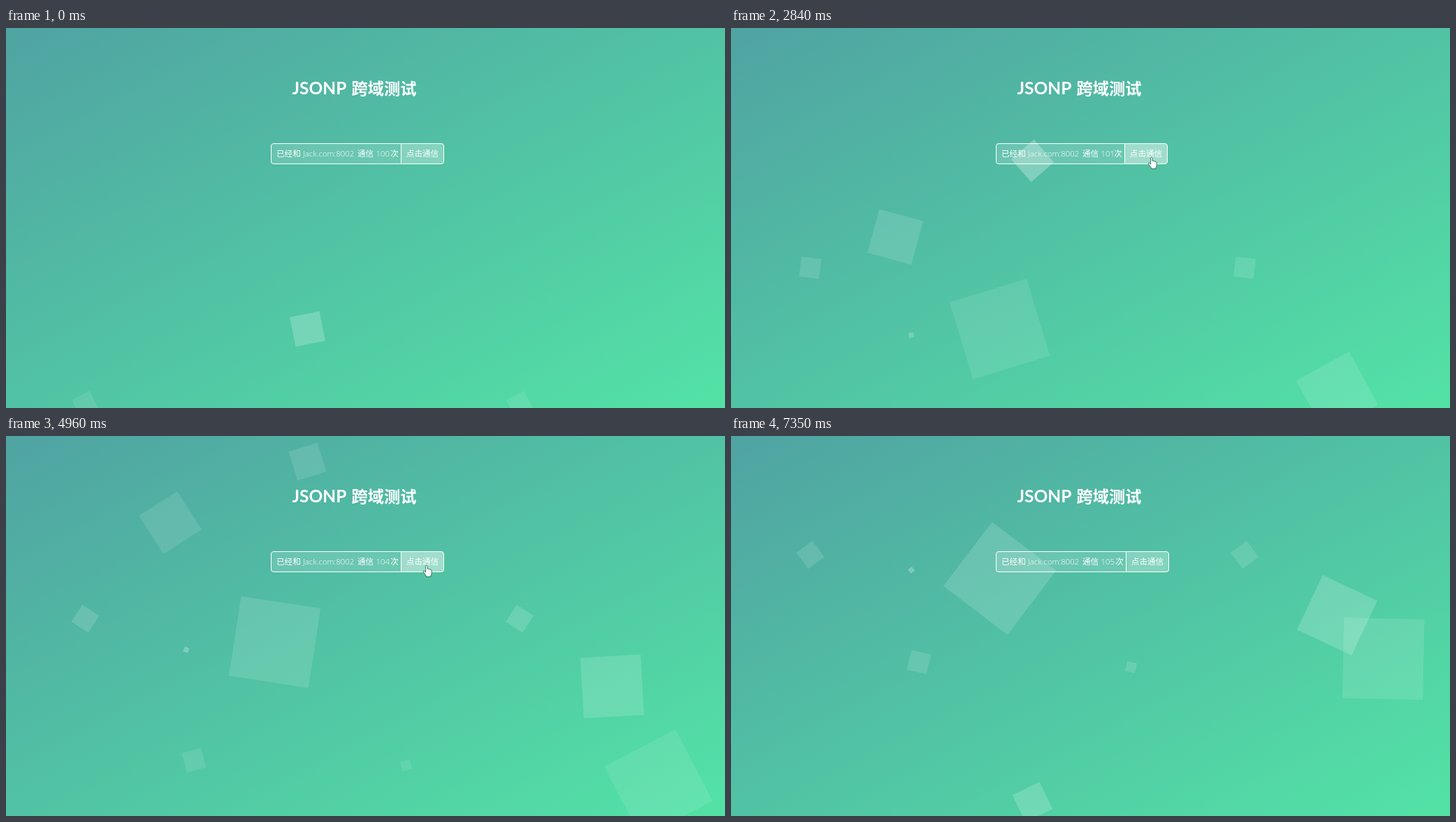
An HTML page for the animation above (7.44 s loop, 1029 by 544 pixels).

```html
<!DOCTYPE html>
<html lang="zh">
<head>
<meta charset="utf-8">
<title>JSONP 跨域测试</title>
<style>
  html, body { margin: 0; width: 100%; height: 100%; overflow: hidden; }
  svg {
    display: block; width: 100vw; height: 100vh;
    background: linear-gradient(to bottom right, #50a3a2, #53e3a6) -4.5px 0 / 1036px 553px no-repeat;
  }
  text { fill: #fff; white-space: pre; }
  .han { font-family: "Noto Sans CJK SC", "Noto Sans CJK", sans-serif; }
  .title { font-weight: 700; font-size: 23.2px; }
  .title.latin { font-family: Lato, "Open Sans", sans-serif; font-size: 24.5px; }
  .small { font-weight: 300; font-size: 11.6px; }
  .small.latin { font-family: "Open Sans", "Noto Sans", sans-serif; font-size: 11.4px; }
</style>
</head>
<body>
<svg id="stage" viewBox="0 0 1029 544" preserveAspectRatio="none">
  <g id="bubbles" fill="#fff"></g>

  <text class="title latin" x="409.5" y="94.5">JSONP</text>
  <text class="title han" x="494.6" y="94.7">跨域测试</text>

  <path id="field" fill="#fff" fill-opacity=".14"/>
  <path id="button" fill="#fff"/>
  <path id="frame" fill="none" stroke="#fff"/>
  <text class="small han" x="387" y="184.2">已经和</text>
  <text class="small latin" x="425" y="184">Jack.com:8002</text>
  <text class="small han" x="503" y="184.2">通信</text>
  <text class="small latin" id="count" x="529.5" y="184"></text>
  <text class="small han" id="times" y="184.2">次</text>
  <text class="small han" id="label" y="184.2">点击通信</text>

  <path id="arrow" fill="#fff" stroke="#26332e" stroke-width=".9" stroke-linejoin="round"
    d="M0 0V11.6L2.7 9.2L4.5 13L6.3 12.2L4.6 8.5H8.2Z"/>
  <path id="hand" fill="#fff" stroke="#1f6b4d" stroke-width=".9" stroke-linejoin="round"
    d="M-1.4 10V1.2Q-1.4 0 -.2 0T1.1 1.2V5.2Q2 4.5 3.2 5.6Q4.4 5 5.2 6.3Q7.2 6 7.2 8V11.5Q7 13.5 6 14.8V16.4H-.8V15Q-2.6 12.8 -4.6 9.6Q-5 7.7 -3.4 8.2Z"/>
</svg>
<script>
const LOOP = 7440, AGE = 1500;   // AGE: time the bubbles have run before the loop starts
const SCALE = 0.72, PAGE_X = -4.5, PAGE_W = 1036, PAGE_H = 553.3;
const $ = id => document.getElementById(id);

const bubbles = [
  { left: .10 },
  { left: .20, size: 90, delay: 2, dur: 7 },
  { left: .25, delay: 4 },
  { left: .40, size: 60, dur: 8, alpha: .3 },
  { left: .70 },
  { left: .80, size: 120, delay: 3, alpha: .2 },
  { left: .32, size: 160, delay: 2 },
  { left: .55, size: 20, delay: 4 },
  { left: .25, size: 10, delay: 2, dur: 12, alpha: .3 },
  { left: .85, size: 160, delay: 5 }
].map(b => ({ size: 40, delay: 0, dur: 15, alpha: .15, ...b }));

for (const b of bubbles) {
  const s = b.size * SCALE;
  b.el = document.createElementNS("http://www.w3.org/2000/svg", "rect");
  for (const [k, v] of Object.entries({ x: -s / 2, y: -s / 2, width: s, height: s })) b.el.setAttribute(k, v);
  b.x = PAGE_X + b.left * PAGE_W + s / 2;
  b.y = PAGE_H + 160 * SCALE - s / 2;
  $("bubbles").append(b.el);
}

// progress, rise, angle, opacity
const risePath = [[0, 0, 45, .5], [.25, 400, 90, .75], [.5, 600, 135, 1], [1, 1000, 180, 0]];
// ms, x, y
const pointerPath = [
  [1080, 945, 552], [1260, 851, 516], [1590, 683, 272], [1900, 602, 185],
  [5480, 602, 185], [5680, 640, 236], [6070, 778, 417], [6420, 886, 552]
];
const clicks = [2560, 3250, 3900, 4540, 5200];
const starts = [-10, 70, 870, 1670, 2450, 3240, 4020, 4820, 5590, 6380, 7180, LOOP];

// Linear interpolation through rows whose first entry is the key.
function along(rows, k) {
  let i = 1;
  while (i < rows.length - 1 && rows[i][0] <= k) i++;
  const a = rows[i - 1], b = rows[i];
  const u = Math.min(1, Math.max(0, (k - a[0]) / (b[0] - a[0])));
  return a.slice(1).map((v, j) => v + (b[j + 1] - v) * u);
}

function stepTime(t) {
  if (t < 70) return 0;
  let i = 1;
  while (t >= starts[i + 1]) i++;
  const step = (starts[i + 1] - starts[i]) / (i === 10 ? 3 : 10);
  return starts[i] + Math.floor((t - starts[i]) / step + .25) * step;
}

function drawBubbles(t) {
  for (const b of bubbles) {
    const run = (t + AGE) / 1000 - b.delay;
    b.el.style.display = run < 0 ? "none" : "";
    if (run < 0) continue;
    const [rise, angle, opacity] = along(risePath, run / b.dur % 1);
    b.el.setAttribute("transform", `translate(${b.x} ${b.y - rise * SCALE}) rotate(${angle})`);
    b.el.setAttribute("fill-opacity", b.alpha * opacity);
  }
}

function drawForm(t, over) {
  const n = 100 + clicks.filter(c => t >= c).length;
  const pressed = clicks.some(c => t >= c - 160 && t < c);
  const shift = n === 101 ? -2 : 0;
  const mid = 565.5 + shift, end = 626.5 + shift;
  const left = `M${mid} 165.5H383Q379.5 165.5 379.5 169V191Q379.5 194.5 383 194.5H${mid}Z`;
  const right = `M${mid} 165.5H${end - 3.5}Q${end} 165.5 ${end} 169V191Q${end} 194.5 ${end - 3.5} 194.5H${mid}Z`;
  $("field").setAttribute("d", left);
  $("button").setAttribute("d", right);
  $("button").setAttribute("fill-opacity", over && !pressed ? .45 : .29);
  $("frame").setAttribute("d", left + right);
  $("count").textContent = n;
  $("times").setAttribute("x", 550.3 + shift);
  $("label").setAttribute("x", 572.8 + shift);
}

function drawPointer(t, over, x, y) {
  const shown = t >= pointerPath[0][0] && t < pointerPath.at(-1)[0];
  for (const [id, on] of [["arrow", !over], ["hand", over]]) {
    $(id).style.display = shown && on ? "" : "none";
    $(id).setAttribute("transform", `translate(${x} ${y})`);
  }
}

function draw(time) {
  const t = stepTime(time % LOOP);
  const [x, y] = along(pointerPath, t);
  const over = x > 565 && x < 627 && y < 195;
  drawBubbles(t);
  drawForm(t, over);
  drawPointer(t, over, x, y);
}

const begin = performance.now();
function tick() {
  draw(performance.now() - begin);
  requestAnimationFrame(tick);
}
tick();
</script>
</body>
</html>
```
